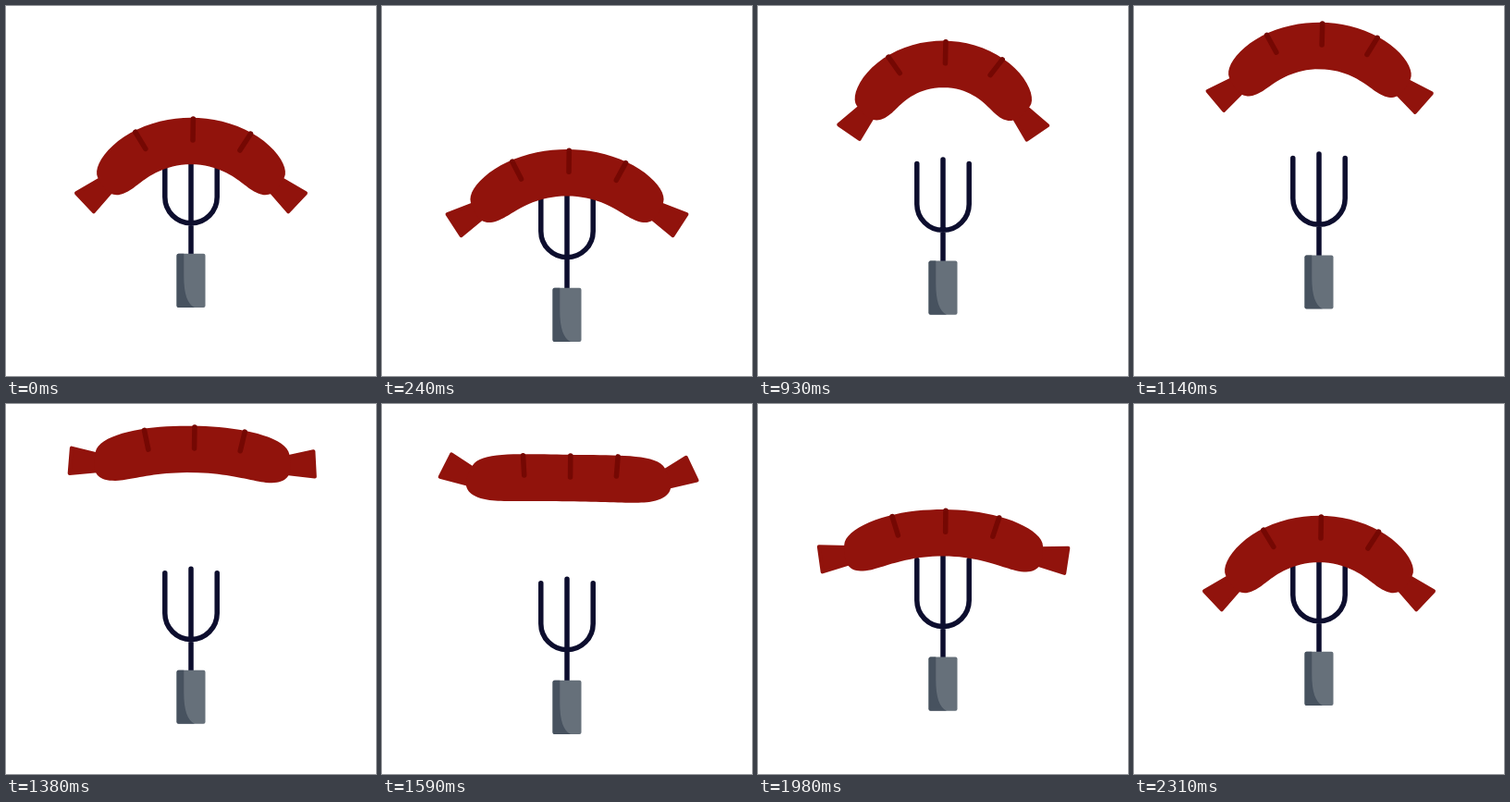
Animation of 400 by 400 pixels, one loop 2.84 s. Source, as an HTML page with a canvas:

```html
<!DOCTYPE html>
<html lang="en">
<head>
<meta charset="utf-8">
<title>Sausage on a fork</title>
<style>
  html, body { margin: 0; height: 100%; overflow: hidden; background: #fff; }
  canvas { display: block; width: 400px; height: 400px; }
</style>
</head>
<body>
<canvas id="stage" width="400" height="400"></canvas>
<script>
const ctx = document.getElementById('stage').getContext('2d');
const LOOP = 2840, STEP = 30, BEAT = 533;
const RED = '#91130c', DARK_RED = '#750803', NAVY = '#0d0e2e';

const easeIn = p => u => u ** p;
const easeOut = p => u => 1 - (1 - u) ** p;
const easeInOut = p => u => u ** p / (u ** p + (1 - u) ** p);

// Starts at a value and eases through [end time, value, easing] moves.
const chain = (start, ...moves) => t => {
  let time = 0, value = start;
  for (const [end, next, ease] of moves) {
    if (t < end) return value + (next - value) * ease((t - time) / (end - time));
    [time, value] = [end, next];
  }
  return value;
};

// Half a sine wave between two times, zero outside.
const bump = (t, from, to) =>
  t > from && t < to ? Math.sin(Math.PI * (t - from) / (to - from)) : 0;

const smooth = easeInOut(2), soft = easeInOut(1.6);
const forkDrop = chain(0, [BEAT, 50, easeOut(2.25)], [2 * BEAT, 0, soft],
  [3 * BEAT, 31, soft], [4 * BEAT, 0, soft]);
const sausageY = chain(146, [BEAT, 195, easeOut(2)], [1110, 43, easeInOut(2.4)],
  [1750, 136, easeIn(3.2)], [2310, 146, smooth]);
const curvature = chain(7.58, [270, 6.25, smooth], [880, 9.4, smooth],
  [1700, -1.55, smooth], [2250, 7.58, smooth]);

// Straight sausage: x along its axis, y across it.
function cubic(a, b, c, d, n = 20) {
  return Array.from({ length: n }, (_, i) => {
    const u = i / n, w = 1 - u;
    return [0, 1].map(k => w ** 3 * a[k] + 3 * w * w * u * b[k] + 3 * w * u * u * c[k] + u ** 3 * d[k]);
  });
}
const mirror = points => points.map(([x, y]) => [-x, y]);
const half = [
  ...cubic([0, -25.2], [45, -25.2], [108, -23.5], [110, -2]),
  ...cubic([110, -2], [118, 16], [114, 28], [88, 29.5]),
  ...cubic([88, 29.5], [70, 30], [45, 25.2], [0, 25.2])
];
const body = [...half, ...mirror(half).reverse()];
const knot = [[106, -1], [135, -13.3], [143, 13], [108, 16]];

function drawSausage(t) {
  const k = curvature(t) / 1000;
  const stretch = 1 - 0.045 * bump(t, BEAT, 4 * BEAT);
  const tilt = 0.014 * bump(t, 800, 2160);
  // Wraps a straight point around a circle of radius 1 / k.
  const bend = ([x, y]) => {
    const s = x * stretch, a = s * k;
    if (Math.abs(k) < 1e-6) return [s, y];
    return [Math.sin(a) * (1 / k - y), (1 - Math.cos(a)) / k + y * Math.cos(a)];
  };
  const trace = points => {
    ctx.beginPath();
    points.forEach(p => ctx.lineTo(...bend(p)));
  };
  ctx.save();
  ctx.translate(200 + tilt * 120, sausageY(t));
  ctx.rotate(tilt);
  ctx.fillStyle = ctx.strokeStyle = RED;
  ctx.lineWidth = 4;
  for (const shape of [knot, mirror(knot)]) {
    trace(shape);
    ctx.closePath();
    ctx.fill();
    ctx.stroke();
  }
  trace(body);
  ctx.fill();
  ctx.strokeStyle = DARK_RED;
  ctx.lineWidth = 5.5;
  for (const side of [-1, 0, 1]) {
    trace([[2 + side * 55, -24 + 2 * Math.abs(side)], [2 + side * 52, -1]]);
    ctx.stroke();
  }
  ctx.restore();
}

function drawFork(t) {
  const cut = 17 * bump(t, 380, 930);
  ctx.save();
  ctx.translate(0, forkDrop(t));
  ctx.strokeStyle = NAVY;
  ctx.lineWidth = 5.5;
  ctx.beginPath();
  ctx.moveTo(200, 158.3 + cut);
  ctx.lineTo(200, 272);
  ctx.moveTo(171.8, 162.8 + cut);
  ctx.arc(200, 206.5, 28.2, Math.PI, 0, true);
  ctx.lineTo(228.2, 162.8 + cut);
  ctx.stroke();

  ctx.beginPath();
  ctx.roundRect(184.5, 267.8, 31, 58.2, 2);
  ctx.fillStyle = '#66707a';
  ctx.fill();
  ctx.clip();
  ctx.fillStyle = '#47525f';
  ctx.fill(new Path2D('M184 267H192.3V292C192.3 311 196 322 204 326H184Z'));
  ctx.restore();
}

function draw() {
  const t = Math.floor(performance.now() % LOOP / STEP) * STEP;
  ctx.clearRect(0, 0, 400, 400);
  ctx.lineCap = ctx.lineJoin = 'round';
  drawFork(t);
  drawSausage(t);
  requestAnimationFrame(draw);
}
draw();
</script>
</body>
</html>
```
